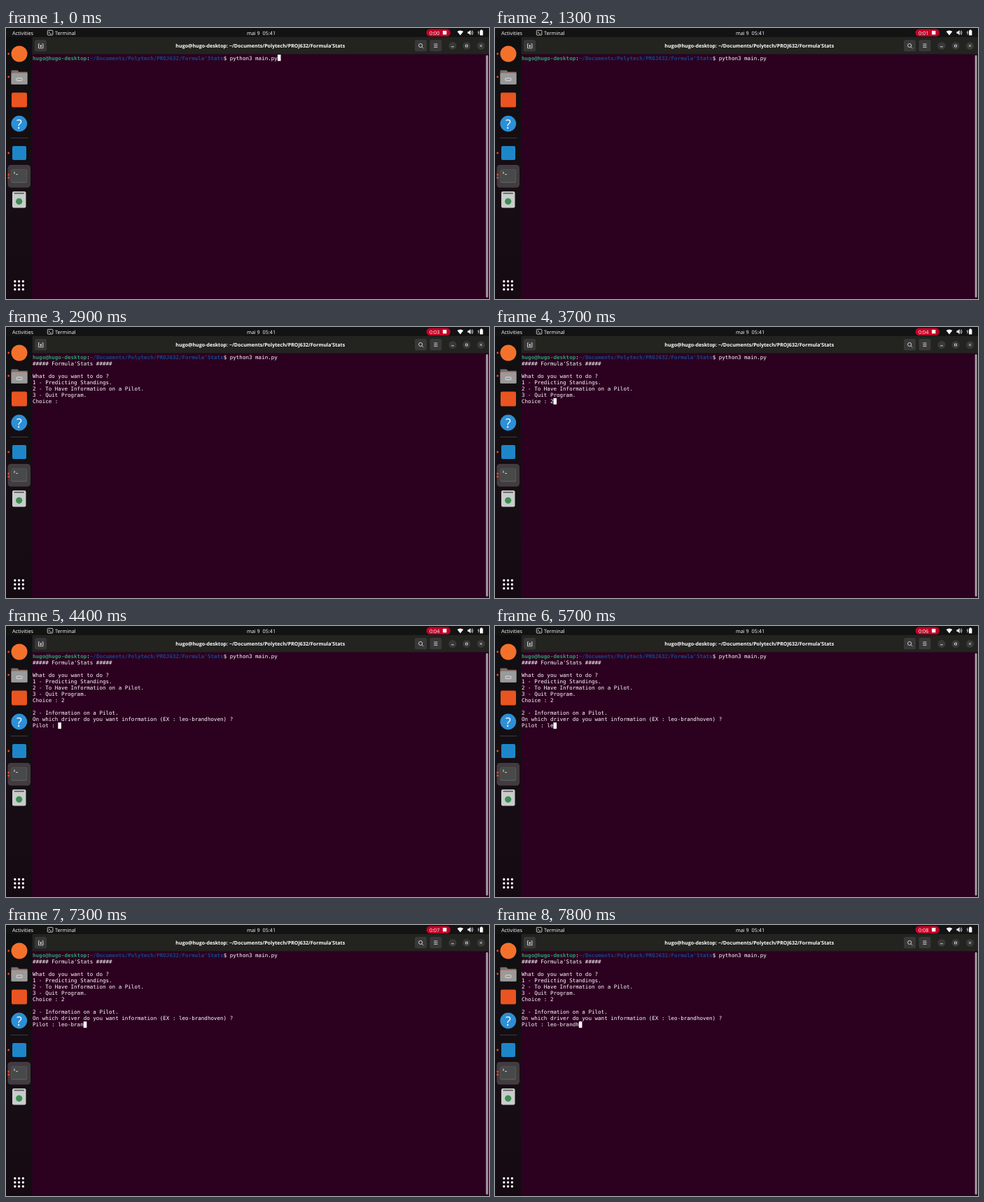
Write an HTML page that moves like this. It is 690 px wide and 388 px high and loops after 8000 ms.

```html
<!DOCTYPE html>
<html lang="en">
<head>
<meta charset="utf-8">
<title>Terminal</title>
<style>
  html, body { margin: 0; width: 100%; height: 100%; overflow: hidden; background: #2c0120; }
  svg { display: block; width: 690px; height: 388px; }
  text { fill: #fff; white-space: pre; text-rendering: geometricPrecision; }
  .ui { font: 7.3px "Open Sans", "Noto Sans", sans-serif; }
  .title { font-size: 7.1px; font-weight: 700; text-anchor: middle; }
  .term { font: 7.55px "DejaVu Sans Mono", monospace; }
  .user { fill: #26a269; font-weight: 700; }
  .path { fill: #12488b; font-weight: 700; }
  .line { fill: none; stroke: #eee; stroke-width: .8; }
  .btn { fill: #383838; }
</style>
</head>
<body>
<svg viewBox="0 0 690 388">
  <defs>
    <linearGradient id="dock" x2="0" y2="1">
      <stop stop-color="#0f0f11"/><stop offset=".6" stop-color="#170d14"/><stop offset="1" stop-color="#150a12"/>
    </linearGradient>
  </defs>
  <rect width="690" height="388" fill="#2c0120"/>
  <rect x="685.7" y="39" width="2.9" height="347" rx="1.4" fill="#aaa1a7"/>

  <!-- title bar -->
  <rect x="37" y="13" width="653" height="24.5" fill="#232320"/>
  <g class="btn">
    <rect x="41" y="17" width="17" height="16.5" rx="2.5"/>
    <rect x="584" y="17" width="17" height="16.5" rx="2.5"/>
    <rect x="605.5" y="17" width="17" height="16.5" rx="2.5"/>
    <circle cx="638" cy="25.5" r="5.6"/><circle cx="658" cy="25.5" r="5.6"/><circle cx="678.5" cy="25.5" r="5.6"/>
  </g>
  <path class="line" d="M48 22.8h-1.5v6h6.5v-6h-1.5M49.8 23.8v4M47.8 25.8h4M594.3 27.2l2 2
    M611.3 23h5.2M611.3 25.3h5.2M611.3 27.6h5.2M636 26.8h4M656.6 24.2h2.8v2.8h-2.8zM676.9 23.9l3.2 3.2m0-3.2l-3.2 3.2"/>
  <circle class="line" cx="592.2" cy="25" r="2.6"/>
  <text class="ui title" x="363.3" y="28">hugo@hugo-desktop: ~/Documents/Polytech/PROJ632/Formula'Stats</text>

  <!-- top bar -->
  <rect width="690" height="13" fill="#131313"/>
  <g class="ui">
    <text x="9" y="9.6">Activities</text>
    <text x="70" y="9.6">Terminal</text>
    <text x="344" y="9.6">mai 9  05:41</text>
    <rect x="600.5" y="1.5" width="34.5" height="10.6" rx="5.3" fill="#c00226"/>
    <text id="timer" x="605" y="9.6"></text>
  </g>
  <rect class="line" x="59.3" y="3.4" width="7.6" height="6.8" rx="1"/>
  <path class="line" d="M61 5.2l1.5 1.3l-1.5 1.3M63 8.4h2"/>
  <rect x="624" y="4" width="5.4" height="5.4" fill="#fff"/>
  <path fill="#fff" d="M644.6 5Q649 1.8 653.4 5L649 10.6zM659.5 5.3h1.7l2.4-2.3v7.4l-2.4-2.3h-1.7zM677 3.6h1v-1h2.2v1h1.2v6.8H677z"/>
  <path class="line" d="M664.7 4.8q1.5 2 0 4M665.9 3.4q2.6 3.3 0 6.6M675.4 4l-1.2 2.6h1.6l-1.2 2.8"/>

  <!-- dock -->
  <rect y="13" width="37.5" height="375" fill="url(#dock)"/>
  <circle cx="19" cy="37" r="11.5" fill="#f4712c"/>
  <path d="M7.5 60.5h9l2 2.2h12v17.8h-23z" fill="#747272"/>
  <rect x="7.5" y="64" width="23" height="2" fill="#b9735f"/>
  <rect x="7.5" y="65" width="23" height="15.8" rx="1.6" fill="#9b9a9a"/>
  <rect class="line" x="15" y="71.8" width="8" height="3.6" rx="1"/>
  <rect x="8" y="92.5" width="22" height="21" rx="2" fill="#e95420"/>
  <circle cx="18.8" cy="137" r="11.4" fill="#2d8fd5"/>
  <text x="18.8" y="143.5" text-anchor="middle" style="font:18px 'Open Sans',sans-serif">?</text>
  <path d="M7 157.5h24" stroke="#4a454a" stroke-width=".8"/>
  <rect x="9" y="169" width="20" height="20" rx="2" fill="#1d86c8"/>
  <rect x="2.5" y="196" width="32.5" height="32.5" rx="4.5" fill="#423c41"/>
  <rect x="7.5" y="202.5" width="22.5" height="19" rx="2" fill="#666766"/>
  <rect x="8" y="202.8" width="21.5" height="17.8" rx="1.6" fill="#474a49"/>
  <path class="line" d="M11 205.8l2 1.5l-2 1.5M14 209.6h3"/>
  <rect x="9" y="234" width="19.5" height="23.5" rx="2.2" fill="#c9ccca"/>
  <rect x="11.5" y="235.8" width="14.5" height="1.8" rx=".9" fill="#5c5e5d"/>
  <circle cx="18.7" cy="248.3" r="4.6" fill="#3c8d55"/>
  <g fill="#e9471f">
    <circle cx="3.7" cy="37" r="1.4"/><circle cx="3.7" cy="70" r="1.4"/><circle cx="3.7" cy="179" r="1.4"/>
    <circle cx="3.7" cy="210" r="1.4"/><circle cx="3.7" cy="214.3" r="1.4"/>
  </g>
  <path d="M12.8 362.8h13M12.8 368.5h13M12.8 374.2h13" stroke="#fff" stroke-width="3.4" stroke-linecap="round" stroke-dasharray="0 5.8"/>

  <!-- terminal -->
  <g class="term">
    <text x="38" y="45.5"><tspan class="user">hugo@hugo-desktop</tspan>:<tspan class="path">~/Documents/Polytech/PROJ632/Formula'Stats</tspan>$ python3 main.py</text>
    <g id="out"></g>
  </g>
  <rect id="cursor" width="4.6" height="9" fill="#fff"/>
</svg>
<script>
const $ = id => document.getElementById(id);
const LOOP = 8000, LEFT = 38, TOP = 38.2, CHAR = 4.545, ROW = 9.09, BLINK = 600;
const ENTER = 690, MENU = 1490, CHOOSE = 3390, ASK = 4090;
const NAME = "leo-brandhoven";
const nameKeys = [5290, 5590, 6090, 6290, 6390, 6590, 6790, 7290, 7490, 7690];
const keys = [90, ENTER, CHOOSE, ASK, ...nameKeys];

const menu = ["##### Formula'Stats #####", "", "What do you want to do ?",
  "1 - Predicting Standings.", "2 - To Have Information on a Pilot.", "3 - Quit Program."];
const question = ["", "2 - Information on a Pilot.",
  `On which driver do you want information (EX : ${NAME}) ?`];

function output(t) {
  if (t < MENU) return [""];
  const lines = [...menu, "Choice : " + (t < CHOOSE ? "" : "2")];
  if (t < ASK) return lines;
  const count = nameKeys.filter(k => k <= t).length;
  return [...lines, ...question, "Pilot : " + NAME.slice(0, count)];
}

let shown;
function draw() {
  const t = performance.now() % LOOP;
  const lines = output(t);
  const html = lines.map((s, i) => `<text x="${LEFT}" y="${45.5 + ROW * (i + 1)}">${s}</text>`).join("");
  if (html !== shown) $("out").innerHTML = shown = html;

  const waiting = t < ENTER;
  const col = waiting ? 77 : lines.at(-1).length;
  $("cursor").setAttribute("x", LEFT + CHAR * col);
  $("cursor").setAttribute("y", TOP + ROW * (waiting ? 0 : lines.length));
  const lastKey = keys.findLast(k => k <= t) ?? keys[0];
  $("cursor").style.opacity = (t - lastKey) % (2 * BLINK) < BLINK ? 1 : 0;

  $("timer").textContent = "0:0" + Math.floor((t + 310) / 1000);
  requestAnimationFrame(draw);
}
draw();
</script>
</body>
</html>
```
